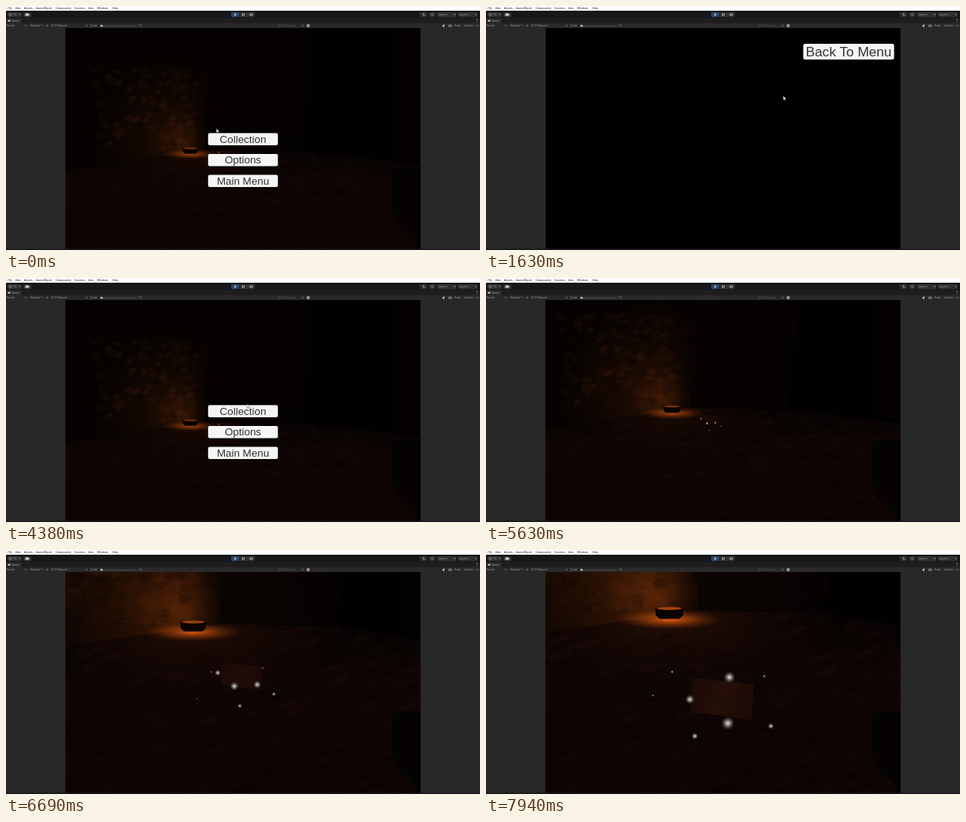
Animation of 600x310 px, one loop 8000 ms. Source, as an HTML page with a canvas:

```html
<!DOCTYPE html>
<html lang="en">
<head>
<meta charset="utf-8">
<title>Pause menu and walk to a note</title>
<style>
  html, body { margin: 0; width: 100%; height: 100%; overflow: hidden; background: #282828; }
  canvas, svg { position: absolute; left: 0; top: 0; width: 600px; height: 310px; }
  .ui { font: 3.6px "Open Sans", sans-serif; }
  .btn { font-family: "Liberation Sans", Arial, sans-serif; fill: #323232; text-anchor: middle; }
</style>
</head>
<body>
<canvas id="view" width="600" height="310"></canvas>
<svg viewBox="0 0 600 310">
  <g id="chrome" class="ui">
    <rect width="600" height="6" fill="#fff"/>
    <rect y="6" width="600" height="9.5" fill="#171717"/>
    <rect y="15.5" width="600" height="6.5" fill="#1e1e1e"/>
    <rect y="15.5" width="20" height="6.5" fill="#2a2a2a"/>
    <rect y="22" width="600" height="6" fill="#292929"/>
    <rect y="308.6" width="600" height="1.4" fill="#161616"/>
    <g fill="#2f2f2f">
      <rect x="2" y="8" width="18" height="6" rx="1"/>
      <rect x="22" y="8" width="10" height="6" rx="1"/>
      <rect x="285" y="8" width="10" height="6" rx="1" fill="#24466b"/>
      <rect x="295.5" y="8" width="19.5" height="6" rx="1"/>
      <rect x="524" y="8" width="9" height="6" rx="1"/>
      <rect x="535" y="8" width="9" height="6" rx="1"/>
      <rect x="546" y="8" width="24" height="6" rx="1"/>
      <rect x="572" y="8" width="25" height="6" rx="1"/>
    </g>
    <g fill="#c4c4c4">
      <path d="M289 9.2l3 1.8-3 1.8zM298.8 9.3h1v3.4h-1zM300.8 9.3h1v3.4h-1zM308.5 9.2l2.4 1.8-2.4 1.8zM311.3 9.3h.9v3.4h-.9z"/>
      <path d="M24.7 12.4a1.2 1.2 0 0 1 .4-2.3 1.8 1.8 0 0 1 3.3 0 1.2 1.2 0 0 1 .5 2.3z"/>
      <circle cx="5.6" cy="11" r="1.5" fill="none" stroke="#aaa" stroke-width=".7"/>
      <rect x="2.5" y="17.4" width="3" height="2.6" rx="1"/>
      <path d="M595.7 16.6h.8v.8h-.8zM595.7 18.3h.8v.8h-.8zM595.7 20h.8v.8h-.8z"/>
      <rect x="380.8" y="23.2" width="3.4" height="3.6" rx=".8" fill="#aaa"/>
      <path d="M552.5 24.3h1l1.5-1.2v4l-1.5-1.2h-1z"/>
      <rect x="560" y="23.6" width="4.4" height="3" fill="#777"/>
      <circle cx="121" cy="25.2" r="1.4"/>
      <path d="M122 25h43v.5h-43z" fill="#666"/>
      <path d="M527 9.5h2.2v1h-2.2zM528 11.3h2.2v1h-2.2z" fill="#aaa"/>
      <path d="M540.2 11.6l1.2 1.2" stroke="#aaa" stroke-width=".6"/>
      <circle cx="539.3" cy="10.7" r="1.2" fill="none" stroke="#aaa" stroke-width=".5"/>
    </g>
  </g>
  <g id="menu"></g>
  <g id="back"></g>
  <path id="cursor" d="M0 0V5.2L1.2 4.2 2 6 2.9 5.6 2.1 3.8H3.7Z" fill="#fff" stroke="#222" stroke-width=".35"/>
</svg>
<script>
const LOOP = 8000;
const $ = id => document.getElementById(id);
const ctx = $('view').getContext('2d');

// ---- editor frame and buttons ----
function add(parent, tag, attrs, text = '') {
  const el = document.createElementNS('http://www.w3.org/2000/svg', tag);
  for (const k in attrs) el.setAttribute(k, attrs[k]);
  el.textContent = text;
  parent.append(el);
}
// one row of labels; an entry is "x text", with a trailing "@x" for a drop-down arrow
function row(y, fill, ...items) {
  for (const item of items) {
    const [, x, text, arrow] = item.match(/^(\S+) ([^@]*)@?(.*)$/);
    add($('chrome'), 'text', { x, y, fill }, text);
    if (arrow) add($('chrome'), 'path', { d: `M${arrow - 1.2} ${y - 2}h2.4l-1.2 1.5z`, fill: '#999' });
  }
}
row(4.4, '#111', '2 File', '12 Edit', '23 Assets', '37.5 GameObject', '62.5 Component',
  '86.5 Services', '104 Jobs', '115.5 Window', '134 Help');
row(12.3, '#aaa', '9.5 KL@17', '547.5 Layers@568', '573.5 Layout@594.5');
row(20.3, '#bbb', '7 Game');
row(26.4, '#a8a8a8', '1 Game@25', '31 Display 1@52', '56.5 16:10 Aspect@102', '107 Scale', '168 1x',
  '567.5 Stats', '579.5 Gizmos@597');
row(26.4, '#585858', '345 Play Focused@376');

function button(parent, x, y, width, height, size, text) {
  add(parent, 'rect', { x, y, width, height, rx: 2.2, fill: '#f5f5f5' });
  add(parent, 'text', { x: x + width / 2, y: y + height / 2 + size * .355, class: 'btn', 'font-size': size }, text);
}
['Collection', 'Options', 'Main Menu'].forEach((s, i) =>
  button($('menu'), 255.8, 161.4 + i * 26.5, 88.4, 15.6, 13.4, s));
button($('back'), 401.6, 48, 115, 20, 17.2, 'Back To Menu');

// ---- motion ----
const OPEN = 940, CLOSE = 3780, RESUME = 4570, NEAR = 6690;
// pointer moves: start, duration, x, y
const MOVES = [[50, 80, 296, 160], [1290, 290, 376.3, 114.3], [2920, 370, 474.3, 71],
  [3290, 260, 472, 58.5], [3980, 390, 305.3, 160]];
// camera: time, bowl x, y, width, note x, y, scale
const WALK = [
  [RESUME, 233.5, 184, 19, 278, 187, .28],
  [5630, 235.5, 167, 22, 283, 180, .36],
  [NEAR, 237, 97, 33, 298, 160, 1],
  [LOOP, 232, 79.5, 36, 298, 190, 1.55]];
// sparks around the note: x, y, radius, drift x, y
const SPARKS = [[41, 23, 2.6, 0, 0], [-30, -4, 4, 4, 5], [-9, 13, 5.6, 15, 8], [20, 11, 5, -14, -30],
  [-2, 38, 2.9, -21, -7], [27, -10, 1.3, 9, -9], [-38, -5, 1.3, -3, -18], [-56, 29, 1, -1, -33]];

const clamp = v => Math.min(1, Math.max(0, v));
const mix = (a, b, f) => a.map((v, i) => v + (b[i] - v) * f);
const pointer = t => MOVES.reduce((p, [start, span, ...to]) => mix(p, to, clamp((t - start) / span)), [266.3, 155.8]);
const camera = t => WALK.slice(1).reduce((p, k, i) =>
  mix(p, k, clamp((t - WALK[i][0]) / (k[0] - WALK[i][0]))), WALK[0]).slice(1);

// ---- dungeon ----
let seed = 7;
const rnd = () => (seed = seed * 16807 % 2147483647) / 2147483647;
const MARKS = Array.from({ length: 420 }, () => [rnd(), rnd(), rnd(), rnd()]);

function poly(points, fill) {
  ctx.beginPath();
  for (let i = 0; i < points.length; i += 2) ctx.lineTo(points[i], points[i + 1]);
  ctx.closePath();
  ctx.fillStyle = fill;
  ctx.fill();
}
function oval(x, y, rx, ry, fill, turn = 0) {
  ctx.beginPath();
  ctx.ellipse(x, y, rx, ry, turn, 0, 7);
  ctx.fillStyle = fill;
  ctx.fill();
}
// soft elliptical light that falls off from the centre
function glow(x, y, rx, ry, rgb, power) {
  ctx.save();
  ctx.translate(x, y);
  ctx.scale(rx, ry);
  const g = ctx.createRadialGradient(0, 0, 0, 0, 0, 1);
  for (let o = 0; o <= 1; o += .125) g.addColorStop(o, `rgba(${rgb},${power * (1 - o) ** 1.4})`);
  ctx.fillStyle = g;
  ctx.fillRect(-1, -1, 2, 2);
  ctx.restore();
}
function fade(x0, y0, x1, y1, ...colors) {
  const g = ctx.createLinearGradient(x0, y0, x1, y1);
  colors.forEach((c, i) => g.addColorStop(i / (colors.length - 1), c));
  return g;
}
// stains and cracks; place(a, b) gives the position of a mark
function grain(size, squash, light, place) {
  ctx.lineWidth = .6;
  MARKS.forEach(([a, b, c, d], i) => {
    const [x, y] = place(a, b), r = size * (.3 + c);
    if (i % 3) oval(x, y, r, r * squash, d > .5 ? light : 'rgba(0,0,0,.16)', -.4 * d);
    else {
      ctx.strokeStyle = 'rgba(0,0,0,.35)';
      ctx.beginPath();
      ctx.moveTo(x, y);
      ctx.lineTo(x + r * (c - .2), y - r * squash * d);
      ctx.lineTo(x + r * (1 + d), y - r * squash * (c + d));
      ctx.stroke();
    }
  });
}

function bowl(x, y, w, power) {
  const h = w * .2, r = w / 2;
  glow(x, y + h * 1.1, w * 1.9, w * .36, '225,92,14', .35 + power * .65);
  poly([x - r, y - h * .8, x + r, y - h * .8, x + r * .95, y + h * .4, x + r * .7, y + h,
    x - r * .7, y + h, x - r * .95, y + h * .4], '#080302');
  oval(x, y - h * .75, r, h * .42, '#120602');
  oval(x, y - h * .85, r * .86, h * .27, `rgba(196,80,16,${.3 + power * .5})`);
  for (let i = -2; i < 3; i++) oval(x + i * r * .36, y - h * .05, w * .015, w * .015, 'rgba(150,62,14,.6)');
}

function scene(t) {
  const [px, py, pw, nx, ny, scale] = camera(t);
  const power = pw / 36, zoom = pw / 20;
  const left = py + 25, corner = px + pw * 1.03, foot = py - pw * .09;
  ctx.fillStyle = '#020101';
  ctx.fillRect(75, 28, 450, 281);

  // far walls
  const far = 330 + pw * 3;
  poly([corner, 28, far, 28, far - 15, foot, corner, foot],
    fade(corner, 0, far, 0, `rgba(18,6,3,${power * .5})`, `rgba(10,3,2,${power * .6})`));
  ctx.fillStyle = fade(492, 0, 525, 0, 'rgba(10,3,1,0)', `rgba(10,3,1,${1.6 - power * 1.6})`);
  ctx.fillRect(492, 28, 33, foot - 15);

  // floor
  ctx.save();
  poly([75, left, corner, foot, far - 15, foot + 2, 525, foot + 20, 525, 309, 75, 309],
    fade(0, foot, 0, 309, '#060202', '#0e0504', '#0e0404', '#0d0404'));
  ctx.clip();
  glow(px, py + 6, pw * 6, pw * 2.2, '70,26,8', power * .5);
  grain(7 * zoom, .35, 'rgba(60,24,16,.09)', (a, b) =>
    [300 + (a - .5) * 380 * zoom, foot + 6 + (309 - foot) * b ** 1.3]);
  ctx.restore();

  // lit wall
  ctx.save();
  poly([75, 28, corner, 28, corner, foot, 75, left], '#060201');
  ctx.clip();
  glow(px - pw, py - pw * 1.1, pw * 6, pw * 5.4, '92,38,8', power * .62);
  glow(px - pw * .4, py - pw * .5, pw * 2.2, pw * 1.8, '150,62,10', power * .38);
  grain(4.5 * zoom, .7, 'rgba(120,54,14,.08)', (a, b) => [px + (a - .85) * 150 * zoom, py - b * 110 * zoom]);
  ctx.fillStyle = fade(corner - pw * 1.2, 0, corner, 0, 'rgba(2,1,1,0)', 'rgba(2,1,1,.65)');
  ctx.fillRect(corner - pw * 1.2, 28, pw * 1.2, foot);
  ctx.restore();

  bowl(px, py, pw, power);

  // note and sparks
  ctx.save();
  ctx.translate(nx, ny);
  ctx.scale(scale, scale);
  ctx.globalAlpha = clamp(.35 + scale * .4);
  poly([-25, -17, 27, -12, 25, 18, -25, 11], fade(-25, -8, 25, 10, '#1c0a06', '#260f08', '#1c0a06'));
  ctx.globalAlpha = 1;
  const drift = Math.max(0, t - NEAR) / (LOOP - NEAR);
  for (const [x, y, r, dx, dy] of SPARKS) glow(x + dx * drift, y + dy * drift, r, r, '235,232,225', 1);
  ctx.restore();

  // held item
  poly([488, 213, 492, 207, 503, 205, 525, 206, 525, 309, 518, 300, 508, 290, 496, 280, 489, 258], '#050202');
  ctx.fillStyle = '#090404';
  for (let y = 212; y < 280; y += 3) ctx.fillRect(491 + Math.max(0, y - 262) * .5, y, 34, .5);
}

function draw(now) {
  const t = now % LOOP;
  const collection = t >= OPEN && t < CLOSE, paused = t < RESUME;
  ctx.fillStyle = '#282828';
  ctx.fillRect(0, 0, 600, 310);
  ctx.save();
  ctx.beginPath();
  ctx.rect(75.5, 28, 449, 280.6);
  ctx.clip();
  if (collection) {
    ctx.fillStyle = '#000';
    ctx.fillRect(75, 28, 450, 281);
  } else scene(t);
  ctx.restore();
  const show = (id, on) => $(id).setAttribute('visibility', on ? 'visible' : 'hidden');
  show('menu', paused && !collection);
  show('back', collection);
  show('cursor', paused);
  $('cursor').setAttribute('transform', `translate(${pointer(t)})`);
}

const start = performance.now();
function frame() {
  draw(performance.now() - start);
  requestAnimationFrame(frame);
}
frame();
</script>
</body>
</html>
```
